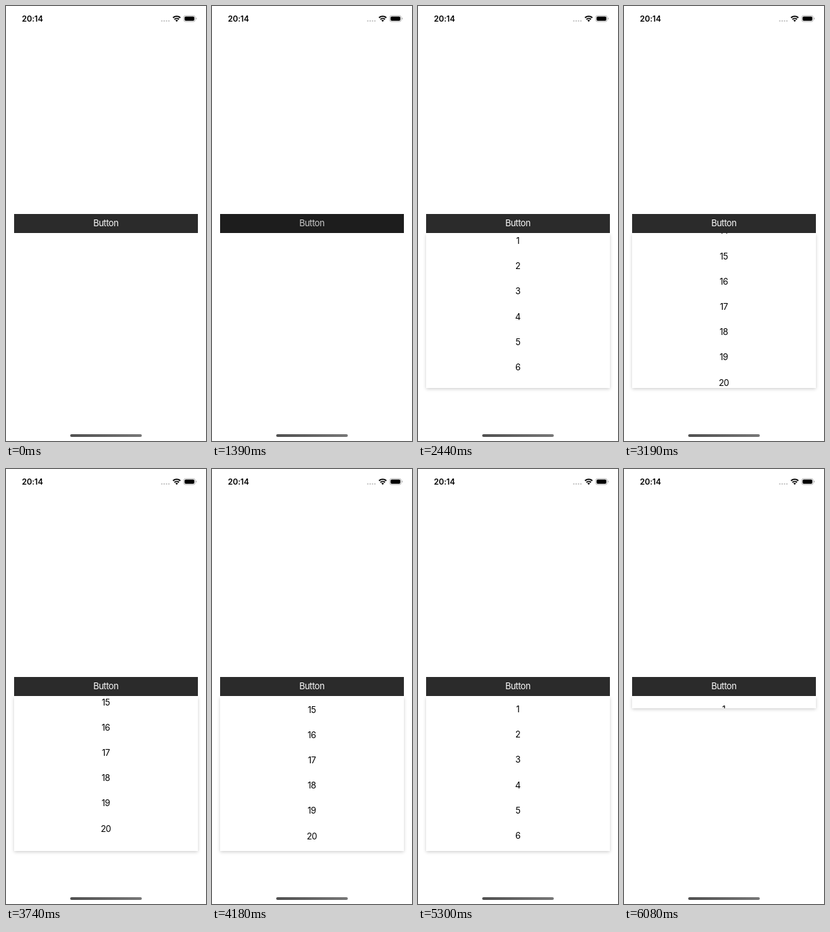
An HTML page that plays this animation: 296 by 640 pixels, repeating every 6.19 s.

```html
<!DOCTYPE html>
<html lang="en">
<head>
<meta charset="utf-8">
<title>Drop-down button</title>
<style>
  html, body { margin: 0; width: 100%; height: 100%; overflow: hidden; background: #fff; }
  body { font-family: Inter, "Liberation Sans", sans-serif; }
  #stage { position: absolute; left: 0; top: 0; width: 296px; height: 640px; overflow: hidden; background: #fff; }
  #clock { position: absolute; left: 23.5px; top: 9px; line-height: 20px; font-size: 11.8px; font-weight: 600; letter-spacing: -.1px; color: #000; }
  #icons { position: absolute; left: 0; top: 0; }
  #button, #list { position: absolute; left: 12px; width: 271.5px; text-align: center; font-size: 12.9px; letter-spacing: -.42px; }
  #button { top: 306px; height: 28px; line-height: 28px; background: #2b2b2b; color: #fff; }
  #button.pressed { background: #1d1d1d; color: #ccc; }
  #list { top: 334px; overflow: hidden; background: #fff; color: #000; box-shadow: 0 1.5px 5px rgba(0, 0, 0, .2); }
  #rows { padding-top: 1px; }
  #rows div { height: 37.2px; line-height: 37.2px; }
  #home { position: absolute; left: 95px; top: 630px; width: 105.5px; height: 4px; border-radius: 2px; background: linear-gradient(90deg, #505050, #777); }
</style>
</head>
<body>
<div id="stage">
  <div id="clock">20:14</div>
  <svg id="icons" width="296" height="40" viewBox="0 0 296 40">
    <g fill="#bdbdbd">
      <circle cx="230.6" cy="22" r="1.1"/><circle cx="234.1" cy="22" r="1.1"/>
      <circle cx="237.6" cy="22" r="1.1"/><circle cx="241.1" cy="22" r="1.1"/>
    </g>
    <g fill="none" stroke="#000" stroke-width="1.9">
      <path d="M247.2 17.3a7.7 7.7 0 0 1 10.8 0"/>
      <path d="M249.3 19.7a4.7 4.7 0 0 1 6.6 0"/>
    </g>
    <path d="M252.6 23.2l-1.9-2a2.7 2.7 0 0 1 3.8 0z"/>
    <rect x="263" y="14.2" width="17" height="8.8" rx="2.6" fill="none" stroke="#a6a6a6" stroke-width=".8"/>
    <rect x="264.3" y="15.5" width="14.4" height="6.2" rx="1.6"/>
    <path d="M281 17.1a1.6 1.6 0 0 1 0 3z" fill="#a6a6a6"/>
  </svg>
  <div id="list"><div id="rows"></div></div>
  <div id="button">Button</div>
  <div id="home"></div>
</div>
<script>
  const LOOP = 6190, FULL = 228, END = 520.4;
  const $ = id => document.getElementById(id);
  const button = $('button'), list = $('list'), rows = $('rows');

  for (let n = 1; n <= 20; n++) {
    const row = document.createElement('div');
    row.textContent = n;
    rows.append(row);
  }

  // Bursts of evenly spaced steps: start, end, count
  const bursts = [[1390, 1820, 5], [2440, 2980, 6], [3080, 3620, 6], [3740, 4180, 5],
                  [4360, 4900, 6], [5000, 5300, 4], [5860, 6080, 3]];
  const steps = [0];
  for (const [from, to, count] of bursts) {
    for (let i = 0; i < count; i++) {
      steps.push(Math.round((from + (to - from) * i / (count - 1)) / 10) * 10);
    }
  }
  const hold = t => steps.reduce((last, s) => s <= t ? s : last, 0);

  const ease = (t, from, to) => {
    const p = Math.min(1, Math.max(0, (t - from) / (to - from)));
    return p * p * (3 - 2 * p);
  };
  const glide = (t, from, reach, drag) => reach * (1 - Math.exp(-drag * (t - from) / 1000));
  const bounce = (t, from, speed, rate) => {
    const s = (t - from) / 1000;
    return speed * s * Math.exp(-rate * s);
  };

  function scrollAt(t) {
    if (t < 2440 || t >= 5300) return 0;
    if (t < 3221) return 7.7 + glide(t, 2440, 945, 1);
    if (t < 4180) return END + bounce(t, 3221, 446, 6);
    if (t < 4360) return END;
    if (t < 4800) return END - 12 - glide(t, 4360, 2573, .5);
    return -bounce(t, 4800, 1032, 12);
  }

  const heightAt = t => FULL * (ease(t, 1460, 1820) - ease(t, 5870, 6123));

  function draw(time) {
    const t = hold(time % LOOP);
    const height = heightAt(t);
    button.className = t === 1390 || t === 5860 ? 'pressed' : '';
    list.style.display = height > 0 ? 'block' : 'none';
    list.style.height = height + 'px';
    rows.style.transform = `translateY(${-scrollAt(t)}px)`;
  }

  const start = performance.now();
  function tick() {
    draw(performance.now() - start);
    requestAnimationFrame(tick);
  }
  tick();
</script>
</body>
</html>
```
